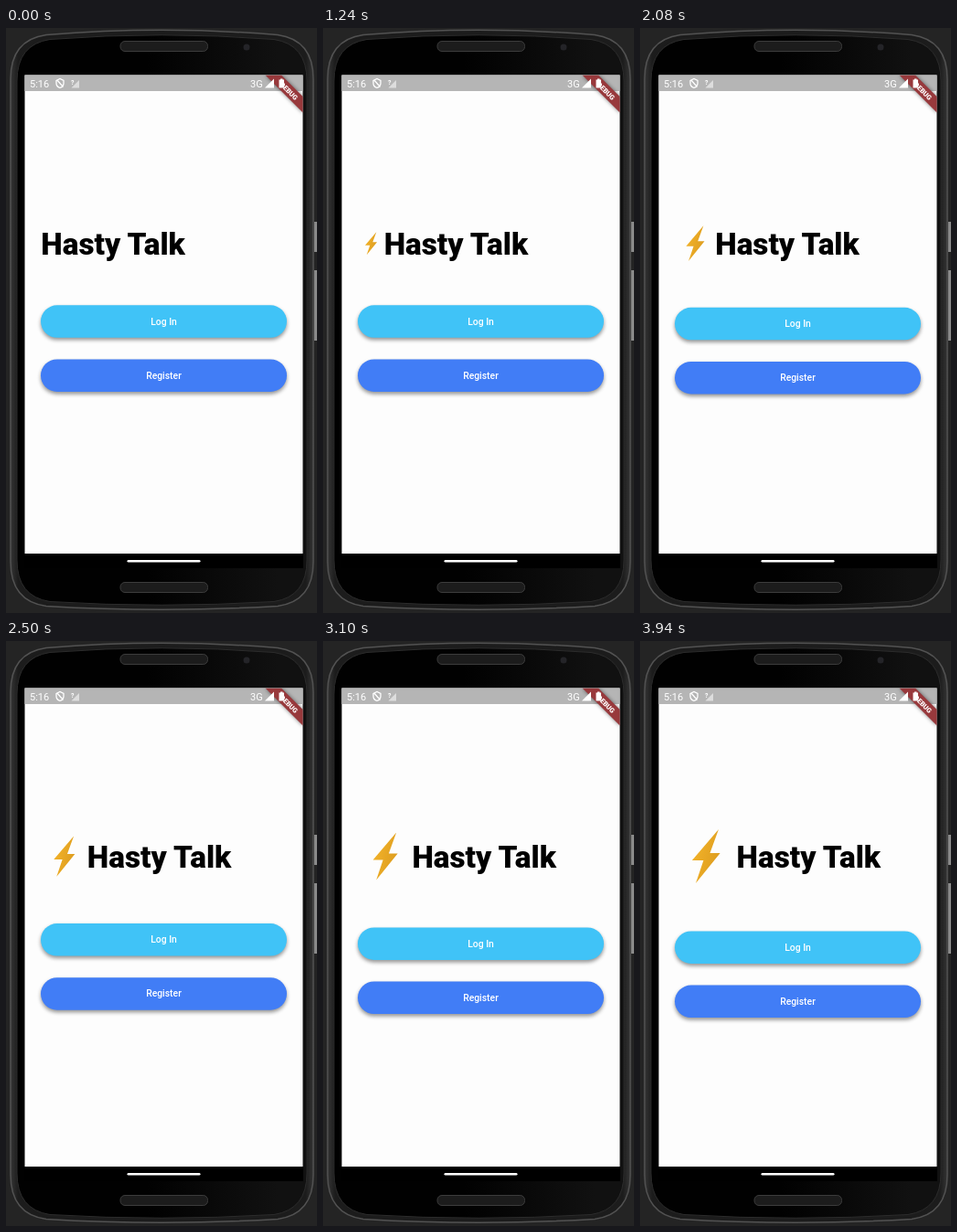
Recreate the animation shown at these times as an HTML page. Size 340x640 px, loop 3.96 s.

```html
<!DOCTYPE html>
<html lang="en">
<head>
<meta charset="utf-8">
<title>Welcome screen</title>
<style>
  html, body { margin: 0; width: 100%; height: 100%; overflow: hidden; background: #242424; }
  svg { display: block; width: 340px; height: 640px; font-family: Roboto, sans-serif; }
  .label { font-size: 10.36px; font-weight: 500; fill: #fff; text-anchor: middle; }
  .status { font-size: 11px; fill: #fff; }
</style>
</head>
<body>
<svg viewBox="0 0 340 640">
  <defs>
    <linearGradient id="rim" x1="0" y1="0" x2="1" y2="0">
      <stop offset="0" stop-color="#353535"/>
      <stop offset=".025" stop-color="#1c1c1c"/>
      <stop offset=".5" stop-color="#1c1c1c"/>
      <stop offset=".975" stop-color="#1c1c1c"/>
      <stop offset="1" stop-color="#353535"/>
    </linearGradient>
    <linearGradient id="glass" x1="0" y1="0" x2="1" y2="0">
      <stop offset=".45" stop-color="#010101"/>
      <stop offset=".9" stop-color="#111"/>
    </linearGradient>
    <linearGradient id="gold" x1="0" y1="0" x2="1" y2=".5">
      <stop offset="0" stop-color="#f5b62c"/>
      <stop offset=".5" stop-color="#eaaa25"/>
      <stop offset="1" stop-color="#dd9d20"/>
    </linearGradient>
    <filter id="soft" x="-10%" y="-40%" width="120%" height="200%">
      <feGaussianBlur stdDeviation="2"/>
    </filter>
    <clipPath id="screen"><rect x="20.5" y="51.5" width="304" height="523.5"/></clipPath>
  </defs>

  <!-- phone body -->
  <rect width="340" height="640" fill="#242424"/>
  <path d="M337 212h3v33h-3zM337 265h3v77h-3z" fill="#8a8a8a"/>
  <path d="M5 56Q5 13 44 7.500Q170 -3 297 7.500Q336 13 336 56V584Q336 627 297 632.500Q170 640 44 632.500Q5 627 5 584Z"
        fill="url(#rim)" stroke="#525252" stroke-width="1.5"/>
  <path d="M12 58Q12 18 48 12.500Q170 3 293 12.500Q329 18 329 58V582Q329 622 293 627.500Q170 635 48 627.500Q12 622 12 582Z"
        fill="url(#glass)" stroke="#2c2c2c"/>
  <g fill="#1c1c1c" stroke="#3c3c3c">
    <rect x="125" y="14.500" width="95.500" height="11" rx="5"/>
    <rect x="125" y="606.500" width="95.500" height="11" rx="5"/>
  </g>
  <circle cx="263" cy="21" r="3.500" fill="#242428"/>
  <rect x="20" y="51.500" width="305" height="539.500" fill="#000"/>
  <rect x="20.5" y="51.500" width="304" height="523.500" fill="#fdfdfd"/>
  <rect x="132.500" y="582" width="80" height="2.600" rx="1.300" fill="#fff"/>

  <!-- app -->
  <g clip-path="url(#screen)">
    <g id="bolt"><path d="M71 5.600L28 56H46.500L34 93L73.500 44H57Z" fill="url(#gold)"/></g>
    <text id="title" y="248" font-size="33.3" font-weight="900">Hasty Talk</text>
    <g id="buttons"></g>

    <rect x="20" y="51" width="305" height="18" fill="#b5b5b5"/>
    <path d="M283.500 51.500H301L325 75.500V93Z" fill="#000" opacity=".5" filter="url(#soft)"/>
    <path d="M283.500 51.500H301L325 75.500V93Z" fill="#98393c"/>
    <text transform="translate(307.500 71) rotate(45)" text-anchor="middle"
          font-size="7.5" font-weight="900" fill="#fff">DEBUG</text>

    <text class="status" x="26" y="64.600">5:16</text>
    <path d="M55 57.500L59 55.500L63 57.500V60.500Q63 64 59 65.500Q55 64 55 60.500ZM55.500 56.500L62.500 64.500"
          fill="none" stroke="#fff" stroke-width="1.300"/>
    <path d="M80 57V65.500H71.500Z" fill="#fff" opacity=".55"/>
    <text x="71" y="61.500" font-size="7" font-weight="700" fill="#fff">?</text>
    <text class="status" x="267" y="64.600">3G</text>
    <path d="M293 55.500V65.500H283Z" fill="#fff"/>
    <path d="M298.500 56.500H300V55.500H302.500V56.500H304V65.500H298.500Z" fill="#fff"/>
  </g>
</svg>
<script>
const LOOP = 3960;
const GROW_TIME = 5645, LOGO_SIZE = 74, TITLE_HEIGHT = 39.2;
const LEFT = 38, ROW_CENTER = 236;
const $ = id => document.getElementById(id);

function button(y, color, label) {
  const box = `x="${LEFT}" width="269" height="35.5" rx="17.75"`;
  return `<rect ${box} y="${y + 2.5}" opacity=".42" filter="url(#soft)"/>
    <rect ${box} y="${y}" fill="${color}"/>
    <text class="label" x="172.5" y="${y + 21.3}">${label}</text>`;
}
$('buttons').innerHTML =
  button(303.3, '#40c3f7', 'Log In') + button(362.4, '#417df6', 'Register');

// Steps come in threes: two of 20 ms and one of 100 ms.
function stepIndex(ms) {
  const shifted = ms + 20, rest = shifted % 140;
  return 3 * Math.floor(shifted / 140) + Math.min(2, Math.floor(rest / 20)) - 1;
}

function draw(ms) {
  const u = (stepIndex(ms) * 140 / 3 + 12) / GROW_TIME;
  const size = LOGO_SIZE * (1 - (1 - u) ** 2);
  const shift = Math.max(0, (size - TITLE_HEIGHT) / 2);
  $('bolt').setAttribute('transform',
    `translate(${LEFT} ${ROW_CENTER - size / 2}) scale(${size / 100})`);
  $('title').setAttribute('x', LEFT + size);
  $('buttons').setAttribute('transform', `translate(0 ${shift})`);
}

const start = performance.now();
function tick() {
  draw((performance.now() - start) % LOOP);
  requestAnimationFrame(tick);
}
tick();
</script>
</body>
</html>
```
